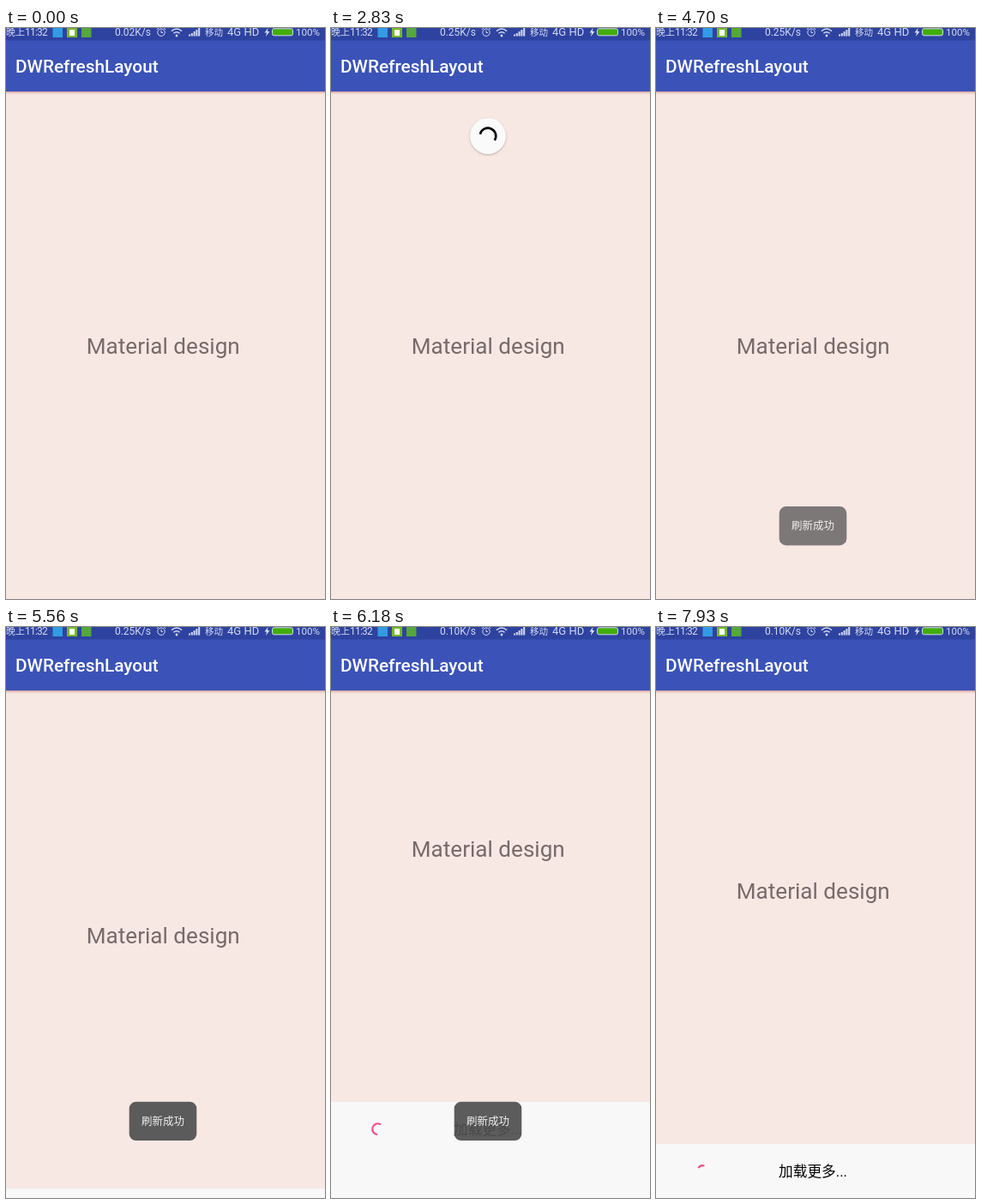
Recreate the animation shown at these times as an HTML page. Size 372 by 666 pixels, loop 8 s.

```html
<!DOCTYPE html>
<html lang="zh">
<head>
<meta charset="utf-8">
<title>Refresh layout</title>
<style>
  html, body { margin: 0; width: 100%; height: 100%; overflow: hidden; background: #f7e8e4; }
  svg { display: block; width: 372px; height: 666px; font-family: Roboto, "Noto Sans CJK SC", "Noto Sans CJK", sans-serif; }
  .mid { text-anchor: middle; }
  .line { fill: none; stroke: #d3d9f1; }
  #disc { filter: drop-shadow(0 1px 1.2px rgba(70, 40, 35, .32)); }
</style>
</head>
<body>
<svg viewBox="0 0 372 666">
  <defs>
    <linearGradient id="shade" x2="0" y2="1">
      <stop offset="0" stop-color="#c9837f" stop-opacity=".75"/>
      <stop offset="1" stop-color="#e9c3bc" stop-opacity="0"/>
    </linearGradient>
  </defs>
  <rect width="372" height="666" fill="#f7e8e4"/>
  <text id="content" class="mid" x="183.3" y="380" font-size="26.1" fill="#776a69">Material design</text>

  <g id="footer">
    <rect width="372" height="140" fill="#f8f8f8"/>
    <path id="footArc" fill="none" stroke="#f8487f" stroke-width="2"/>
    <text id="footText" class="mid" x="183" y="38" font-size="16.7" fill="#000"></text>
  </g>

  <g id="spinner">
    <circle id="disc" r="21" fill="#fafafa"/>
    <path id="arc" fill="none" stroke="#000" stroke-width="2.6"/>
  </g>

  <rect y="74" width="372" height="4" fill="url(#shade)"/>
  <rect width="372" height="74" fill="#3b53b8"/>
  <rect width="372" height="14.5" fill="#2e43a0"/>
  <text x="11" y="52" font-size="20.8" font-weight="500" fill="#fff">DWRefreshLayout</text>

  <g fill="#d3d9f1" font-size="12">
    <text x="0" y="9" font-size="11">晚上</text>
    <text x="22" y="9.3" letter-spacing="-.8">11:32</text>
    <text id="speed" x="169" y="9.3" text-anchor="end"></text>
    <text x="232" y="9" font-size="10.5">移动</text>
    <text x="258" y="9.3" font-size="13">4G HD</text>
    <text x="338" y="9.3" font-size="11.6">100%</text>
    <rect x="54.5" y="-1" width="11.5" height="12" fill="#329be3"/>
    <rect x="71" y="-1" width="12" height="12" fill="#75b82a"/>
    <rect x="74" y="2" width="6" height="7" fill="#fff"/>
    <rect x="88" y="-1" width="11.5" height="12" fill="#55a83a"/>
    <path d="M213 9.5v-2h2v2zM215.8 9.5V6h2v3.5zM218.6 9.5V4h2v5.5zM221.4 9.5V2h2v7.5zM224.2 9.5V0h2v9.5z"/>
    <path d="M305.5 0L301.5 5.5H304L303 10L307.5 4H305z"/>
    <circle cx="199" cy="9" r="1.4"/>
  </g>
  <g class="line">
    <circle cx="181" cy="5.2" r="4.2"/>
    <path d="M181 2.8V5.5H183M175.8 2l2-2M186.2 2l-2-2"/>
    <path d="M193 3.6Q199 -1.6 205 3.6M195.4 6.3Q199 3.2 202.6 6.3" stroke-width="1.5"/>
    <rect x="310.5" y=".8" width="24" height="8" rx="2" fill="#42ad09"/>
  </g>

  <g id="toast">
    <rect x="143.7" y="553.7" width="78.6" height="45.3" rx="8" fill="#505050" fill-opacity=".92"/>
    <text class="mid" x="183" y="581" font-size="12.5" fill="#f0f0f0">刷新成功</text>
  </g>
  <path id="cursor" d="M0 0V16L4 12.5L6.5 18L8.8 17L6.4 11.5H11z" fill="#fff" stroke="#000"/>
</svg>

<script>
const LOOP = 8000;
const $ = id => document.getElementById(id);
const clamp = (v, a = 0, b = 1) => Math.min(b, Math.max(a, v));
const smooth = x => { x = clamp(x); return x * x * (3 - 2 * x); };

// Screen refreshes: [first time, interval, number of steps]
const bursts = [
  [0, 830, 1], [830, 132, 8], [1910, 132, 8], [2990, 132, 8],
  [4040, 130, 7], [5560, 153, 7], [6630, 146, 8], [7780, 150, 2]
];
function snap(t) {
  const [from, gap, n] = bursts.filter(b => b[0] <= t).pop();
  return from + gap * Math.min(n - 1, Math.floor((t - from) / gap));
}

// Linear interpolation through [time, value] pairs
function track(t, keys) {
  if (t <= keys[0][0]) return keys[0][1];
  for (let i = 1; i < keys.length; i++) {
    const [t0, a] = keys[i - 1], [t1, b] = keys[i];
    if (t <= t1) return a + (b - a) * (t - t0) / (t1 - t0);
  }
  return keys[keys.length - 1][1];
}

function arcPath(r, start, sweep, cx = 0, cy = 0) {
  const point = deg => {
    const a = deg * Math.PI / 180;
    return `${cx + r * Math.cos(a)} ${cy + r * Math.sin(a)}`;
  };
  return `M${point(start)}A${r} ${r} 0 ${sweep > 180 ? 1 : 0} 1 ${point(start + sweep)}`;
}

// Material progress: the head runs ahead, then the tail catches up
function spin(t, from, cycle, rate, base) {
  const turns = (t - from) / cycle, n = Math.floor(turns), p = turns - n;
  const head = smooth(2 * p), tail = smooth(2 * p - 1);
  return [base + 288 * (n + tail) + rate * (t - from), 17 + 288 * (head - tail)];
}

function drawSpinner(t) {
  const shown = t >= 830 && t < 4550;
  $('spinner').style.display = shown ? '' : 'none';
  if (!shown) return;
  const pull = (t - 830) / 930;
  const y = track(t, [[830, 113], [1490, 126], [3910, 126], [4290, 119.7]]);
  const scale = 1 - clamp((t - 4310) / 240);
  $('spinner').setAttribute('transform', `translate(183 ${y}) scale(${scale})`);
  $('spinner').setAttribute('opacity', clamp(.3 + .8 * pull));
  const [start, sweep] = t < 1910
    ? [-90 + 155 * pull, 1 + 197 * pull]
    : spin(t, 977, 1333, 216 / 1333, -14);
  $('arc').setAttribute('d', arcPath(9.3, start, sweep));
}

function drawFooter(t) {
  const lift = track(t, [[5450, 0], [5560, 11], [5719, 65], [5866, 111], [6019, 118], [6172, 112], [6325, 75], [6478, 63]]);
  const loading = t >= 6170;
  $('content').setAttribute('transform', `translate(0 ${-lift})`);
  $('footer').setAttribute('transform', `translate(0 ${666 - lift})`);
  $('footText').textContent = loading ? '加载更多...' : '松开加载更多';
  const [start, sweep] = loading
    ? spin(t, 6545, 1215, .205, 3)
    : [-121 + lift, Math.max(1, lift * 1.8)];
  $('footArc').setAttribute('d', arcPath(6.4, start, sweep, 54.6, 31.6));
}

function drawToast(t) {
  const p = clamp((t - 4450) / 300) * clamp((6610 - t) / 300);
  $('toast').setAttribute('opacity', p);
  $('toast').setAttribute('transform', `translate(0 ${22 * (1 - p)})`);
}

function drawCursor(t) {
  $('cursor').style.display = t >= 1350 && t < 1900 ? '' : 'none';
  const x = track(t, [[1358, 305], [1490, 295.5], [1622, 318], [1754, 346]]);
  const y = track(t, [[1358, 657], [1490, 660.5], [1754, 655]]);
  $('cursor').setAttribute('transform', `translate(${x} ${y})`);
}

function render(time) {
  const t = snap(time);
  drawSpinner(t);
  drawFooter(t);
  drawToast(t);
  drawCursor(t);
  $('speed').textContent = (t < 2400 ? '0.02' : t < 6170 ? '0.25' : '0.10') + 'K/s';
}

const began = performance.now();
function tick() {
  render((performance.now() - began) % LOOP);
  requestAnimationFrame(tick);
}
tick();
</script>
</body>
</html>
```
